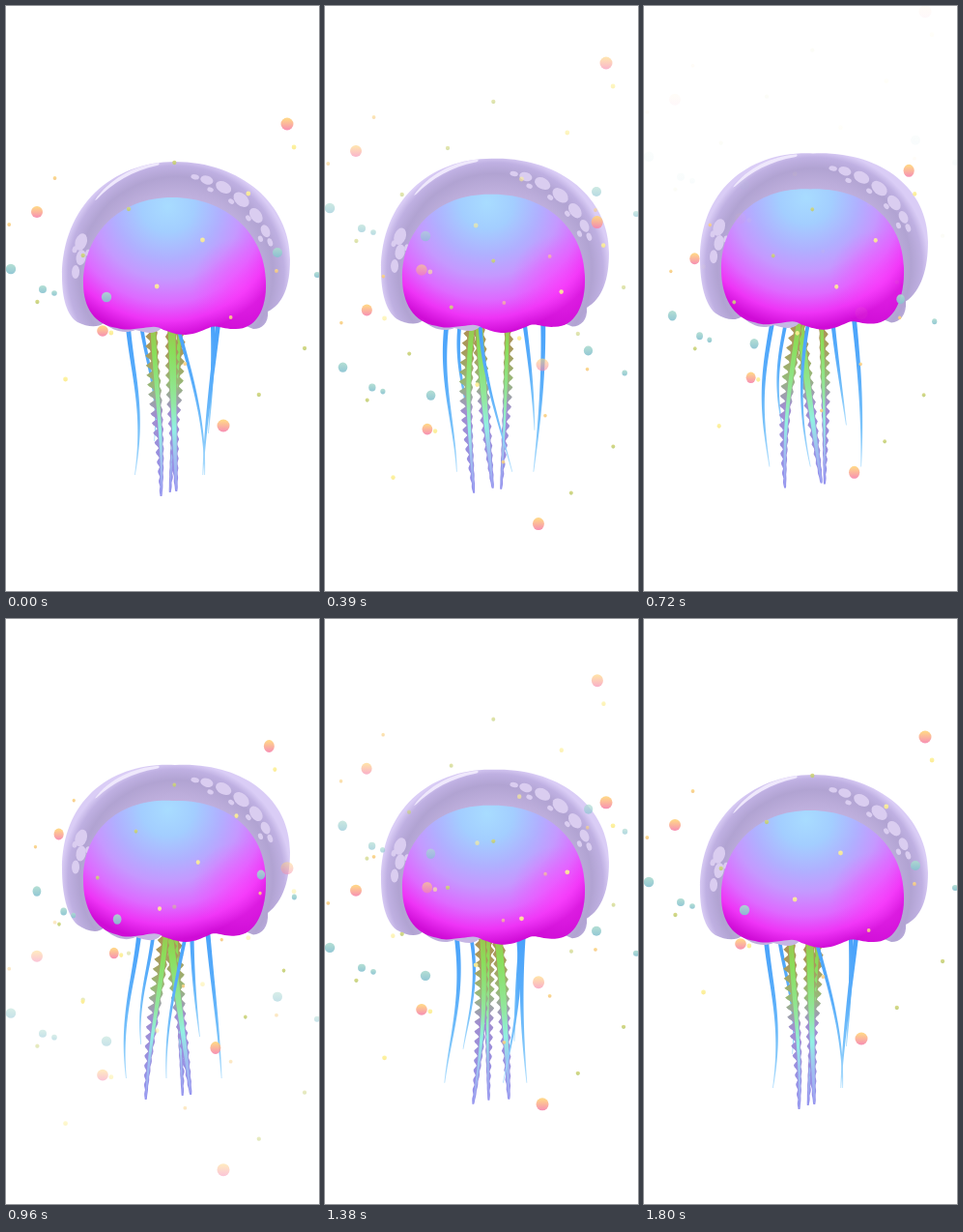
An HTML page with a canvas for the animation above (1830 ms loop, 324x605 px).

```html
<!DOCTYPE html>
<html lang="en">
<head>
<meta charset="utf-8">
<title>Jellyfish</title>
<style>
  html, body { margin: 0; width: 100%; height: 100%; overflow: hidden; background: #fff; }
  canvas { display: block; width: 324px; height: 605px; }
</style>
</head>
<body>
<canvas id="stage"></canvas>
<script>
const W = 324, H = 605;
const LOOP = 1830, CYCLE = 1800, STEP = 30;
const canvas = document.getElementById('stage');
const ctx = canvas.getContext('2d');
const ratio = window.devicePixelRatio || 1;
canvas.width = W * ratio;
canvas.height = H * ratio;

const wave = turns => Math.cos(turns * 2 * Math.PI);
const mix = (a, b, v) => a + (b - a) * v;
const clamp = n => Math.max(0, Math.min(1, n));

function withStops(gradient, stops) {
  stops.forEach(([at, color]) => gradient.addColorStop(at, color));
  return gradient;
}

function ellipse(x, y, rx, ry, tilt = 0) {
  ctx.beginPath();
  ctx.ellipse(x, y, rx, ry, tilt, 0, 7);
  ctx.fill();
}

// ---- Bell ----
const CX = 176, CY = 278, LIFT = 10;
const outer =
  'M58 280 C58 207 110 161 175 161 C243 161 294 205 294 262 ' +
  'C294 290 287 308 271 316 C272 328 265 334 256 334 L236 326 L160 334 ' +
  'C152 341 143 337 134 335 C122 340 110 335 101 328 C95 333 84 332 74 327 C63 320 58 302 58 280 Z';
const inner =
  'M80 287 C80 235 118 198 172 198 C228 198 268 235 269 285 C270 315 258 334 238 334 ' +
  'C225 335 218 329 210 333 C202 336 197 339 186 340 C175 340 170 337 163 335 ' +
  'C156 330 150 332 142 333 C130 334 125 336 115 333 C92 330 80 312 80 287 Z';
const shine = 'M92 201 C106 180 132 165 158 162 Q160 164 156 165 C132 170 110 183 94 200 Z';

const outerFill = withStops(ctx.createRadialGradient(CX, 277, 70, CX, 277, 119), [
  [0, '#c6b6e4'], [.35, '#bbacda'], [.62, '#b1a3d2'], [.85, '#bfb0e2'], [1, '#dacdf6']
]);
const innerFill = withStops(ctx.createRadialGradient(168, 207, 0, 166, 205, 137), [
  [0, '#a8dcff'], [.2, '#a3ceff'], [.4, '#b0b0ff'], [.56, '#c598ff'],
  [.74, '#dd6aff'], [.88, '#ee34f6'], [1, '#cf0cd6']
]);
const glow = withStops(ctx.createRadialGradient(242, 290, 0, 242, 290, 50), [
  [0, 'rgba(255,70,255,.5)'], [1, 'rgba(255,70,255,0)']
]);

// How much further than the crown a point climbs: the flanks most, the hem least.
function climb(x, y) {
  const side = Math.abs(x - CX) / 118;
  return 11 * side * side - Math.max(0, (y - 290) / 45) * (3 + 7 * side);
}

function fillShape(path, k, color) {
  ctx.fillStyle = color;
  ctx.fill(new Path2D(path.replace(/([\d.]+) ([\d.]+)/g,
    (_, x, y) => x + ' ' + (y - k * climb(x, y)))));
}

// A spot placed by its angle from the crown and its distance from the bell's centre.
function spot(k, degrees, radius, length, width) {
  const a = degrees * Math.PI / 180;
  const x = CX + radius * Math.sin(a), y = CY - radius * Math.cos(a);
  ellipse(x, y - k * climb(x, y), length, width, a);
}

function drawSpots(k) {
  ctx.fillStyle = '#dacdf0';
  for (let i = 0; i < 7; i++) {
    const u = i / 6, bulge = Math.sin(Math.PI * u);
    spot(k, 41 + 15 * (2 * u - 1 - Math.cos(Math.PI * u)), 103, 4.3 + 5 * bulge, 2.6 + 3.6 * bulge);
  }
  for (let i = 0; i < 4; i++) spot(k, 22 + 15 * i, 95, 3.3, 2.4);
  for (let i = 0; i < 3; i++) spot(k, -71 - 8.7 * i, 104 - 4 * (i % 2), 9 - i, 6 - i);
  for (const radius of [94, 108]) spot(k, -76, radius, 3.5, 2.6);
}

function drawBell(k) {
  ctx.save();
  ctx.translate(0, -LIFT * k);
  fillShape(outer, k, outerFill);
  fillShape(shine, k, '#efe8fc');
  drawSpots(k);
  fillShape(inner, k, innerFill);
  fillShape(inner, k, glow);
  ctx.restore();
}

// ---- Tentacles: a travelling wave along a centre line; phase and lag in turns ----
const ROOT = 322;
const tentacle = (root, tip, amp, phase, lag, end, width) =>
  ({ root, tip, amp, phase, lag, end, width });

const backStrands = [
  tentacle(146, 147, 8, .58, .52, 450, 4),
  tentacle(203, 206, 11, 0, .2, 442, 4.5)
];
const frontStrands = [
  tentacle(180, 186, 20, .71, .32, 485, 4),
  tentacle(132, 129.5, 7.3, .58, .58, 485, 5),
  tentacle(215, 214, 11, .17, .27, 485, 5)
];
const rightRibbon = tentacle(179, 177, 10, .22, .16, 503, 5);
const middleRibbon = tentacle(168, 183, 10.5, .8, -.16, 502, 10);
const leftRibbon = tentacle(159, 152.5, 8, .58, .42, 507, 7);

const blue = [[0, '#46a0fb'], [.45, '#5aaefa'], [.75, '#7cc4fa'], [1, '#b4e0fd']];
const frillFill = [[0, '#b08c50'], [.2, '#a89a5c'], [.38, '#98b878'], [.55, '#a08ed0'], [1, '#9290ee']];
const coreFill = [[0, '#a4b84a'], [.2, '#8ade5a'], [.5, '#92e8a4'], [.64, '#92f0e4'], [.8, '#a0c0f0'], [1, '#a0a4f2']];

const sway = (t, v, p) => mix(t.root, t.tip, v) + t.amp * wave(p - t.phase - t.lag * v);

// Fills the band between two offsets from the swaying centre line.
function band(t, p, left, right, stops) {
  const count = Math.ceil((t.end - ROOT) / 2);
  ctx.beginPath();
  for (let i = 0; i <= count; i++) {
    const v = i / count;
    ctx.lineTo(sway(t, v, p) - left(v), mix(ROOT, t.end, v));
  }
  for (let i = count; i >= 0; i--) {
    const v = i / count;
    ctx.lineTo(sway(t, v, p) + right(v), mix(ROOT, t.end, v));
  }
  ctx.fillStyle = withStops(ctx.createLinearGradient(0, ROOT, 0, t.end), stops);
  ctx.fill();
}

function drawStrand(t, p) {
  const half = v => mix(t.width / 2, .4, v ** 1.4);
  band(t, p, half, half, blue);
}

// Saw-toothed frills swell towards the middle and thin out at the tip.
function drawRibbon(t, p, frillLeft, frillRight) {
  const taper = v => (1 - v) ** .5;
  const frill = (size, shift) => v => {
    const tooth = Math.abs((v * (t.end - ROOT) / 10 + shift) % 1 * 2 - 1);
    return .9 + taper(v) * t.width * .3 + size * (.5 + Math.sin(Math.PI * v)) * taper(v) * tooth;
  };
  band(t, p, frill(frillLeft, 0), frill(frillRight, .4), frillFill);
  const half = v => t.width * .4 * taper(v);
  band(t, p, half, half, coreFill);
}

function drawTentacles(p, k) {
  ctx.save();
  ctx.translate(0, -LIFT * k);
  backStrands.forEach(s => drawStrand(s, p));
  drawRibbon(rightRibbon, p, 1, 5);
  drawRibbon(middleRibbon, p, 4, 3);
  drawRibbon(leftRibbon, p, 7, 2);
  frontStrands.forEach(s => drawStrand(s, p));
  ctx.restore();
}

// ---- Bubbles ----
const pink = ['#ffd07c', '#f683ac'], teal = ['#a9d9cf', '#86c1d0'];
const specks = [['#fdf29a', '#fbe98a'], ['#d3d67c', '#bccb72'], ['#fbd888', '#f5c47e']];
const SPEED = .1615;

const bubble = (tone, x, y, r) => ({ tone, x, y, r });
const bubbles = [
  bubble(pink, 291, 122, 6.5), bubble(pink, 32, 213, 6),
  bubble(pink, 100, 336, 5.8), bubble(pink, 225, 434, 6.5),
  bubble(teal, 5, 272, 5.2), bubble(teal, 38, 293, 4), bubble(teal, 50, 297, 2.8),
  bubble(teal, 104, 301, 5.2), bubble(teal, 281, 255, 5), bubble(teal, 322, 278, 3)
];
// Small specks, spread evenly by the golden ratio.
for (let i = 0; i < 17; i++) {
  bubbles.push(bubble(specks[i % 3], (i * .618 + .92) % 1 * W, 146 + i * 16, 2.4 - i % 3 * .25));
}

function drawBubbles(time, born, squeeze) {
  const age = (time - born + CYCLE) % CYCLE;
  const alpha = clamp(age / 200) * clamp((1700 - age) / 550);
  if (!alpha) return;
  ctx.save();
  ctx.globalAlpha = alpha * .9;
  ctx.translate(174 * squeeze, -SPEED * (age - 945));
  ctx.scale(1 - squeeze, 1);
  for (const { tone, x, y, r } of bubbles) {
    ctx.fillStyle = withStops(ctx.createLinearGradient(0, y - r, 0, y + r), [[.1, tone[0]], [1, tone[1]]]);
    ellipse(x, y, r, r);
  }
  ctx.restore();
}

function draw(time) {
  const p = time / CYCLE;
  const k = (1 - wave(p - .022)) / 2;
  ctx.setTransform(ratio, 0, 0, ratio, 0, 0);
  ctx.fillStyle = '#fff';
  ctx.fillRect(0, 0, W, H);
  drawTentacles(p, k);
  drawBell(k);
  drawBubbles(time, 855, 0);
  drawBubbles(time, 74, .175 * (1 - Math.abs(time - 880) / 900));
}

const start = performance.now();
function tick() {
  const now = (performance.now() - start) % LOOP;
  draw(Math.floor(now / STEP) * STEP);
  requestAnimationFrame(tick);
}
tick();
</script>
</body>
</html>
```
